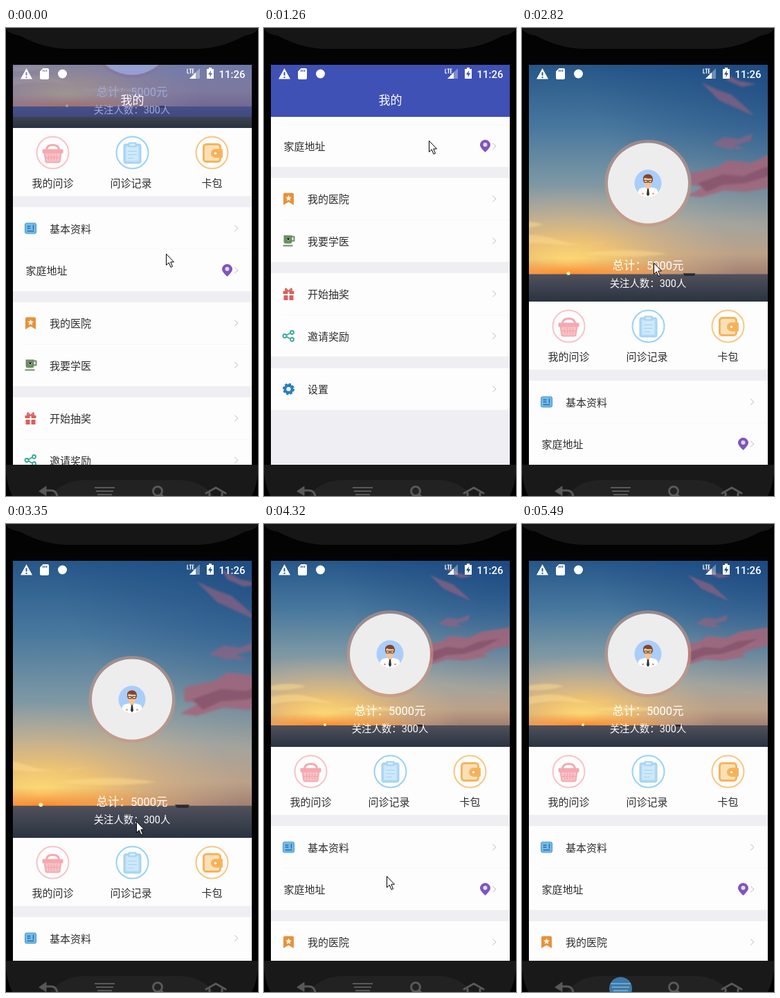
Recreate the animation shown at these times as an HTML page. Size 364x674 px, loop 6.08 s.

```html
<!DOCTYPE html>
<html lang="zh-CN">
<head>
<meta charset="utf-8">
<style>
  html, body { margin: 0; width: 100%; height: 100%; overflow: hidden; background: #030303; }
  svg { display: block; width: 364px; height: 674px; }
  text { font-family: Roboto, "Noto Sans CJK SC", "Noto Sans CJK", sans-serif; fill: #2e2e2e; font-size: 15px; }
  .mid { text-anchor: middle; }
  .light { fill: #fff; }
  .line { fill: none; stroke-linecap: round; stroke-linejoin: round; }
</style>
</head>
<body>
<svg viewBox="0 0 364 674">
  <defs>
    <clipPath id="screen"><path d="M10 53H355V629H10Z"/></clipPath>
    <clipPath id="face"><circle r="20"/></clipPath>
    <filter id="soft"><feGaussianBlur stdDeviation="1.200"/></filter>
    <linearGradient id="sky" x2="0" y2="1">
      <stop stop-color="#265789"/><stop offset=".3" stop-color="#49789e"/>
      <stop offset=".55" stop-color="#7a96a4"/><stop offset=".75" stop-color="#a3a49e"/>
      <stop offset=".9" stop-color="#bba188"/><stop offset="1" stop-color="#a27d70"/>
    </linearGradient>
    <radialGradient id="dusk" cx="1" cy="0" r="1">
      <stop stop-color="#143f7c" stop-opacity=".6"/><stop offset="1" stop-color="#143f7c" stop-opacity="0"/>
    </radialGradient>
    <radialGradient id="glow">
      <stop stop-color="#ffe078"/><stop offset=".3" stop-color="#fbca6c" stop-opacity=".8"/>
      <stop offset=".65" stop-color="#e6bd82" stop-opacity=".4"/><stop offset="1" stop-color="#d8bd98" stop-opacity="0"/>
    </radialGradient>
    <radialGradient id="ember">
      <stop stop-color="#ff8a2c"/><stop offset="1" stop-color="#ee8846" stop-opacity="0"/>
    </radialGradient>
    <linearGradient id="sea" x2="0" y2="1"><stop stop-color="#50515c"/><stop offset="1" stop-color="#29323f"/></linearGradient>
  </defs>

  <!-- phone body -->
  <path fill="#030303" d="M0 0H364V674H0Z"/>
  <path fill="#161616" d="M0 0H364Q362 8 345 11Q310 30 275 30H90Q55 30 20 11Q2 8 0 0Z"/>
  <path fill="#191919" d="M0 629H364V640Q362 660 355 674H9Q2 660 0 640Z"/>
  <path fill="#222" d="M64 674Q82 652 112 651H252Q282 652 300 674Z"/>
  <circle id="hover" cx="142.500" cy="669" r="16.500" fill="#3c79a8"/>
  <g class="line" stroke="#585858" stroke-width="3">
    <path fill="#585858" stroke-width="1" d="M48 667L58 660V673Z"/>
    <path d="M57 666H65Q73 666 74 675"/>
    <path id="menu" stroke-width="2" stroke-linecap="butt" d="M128 662H157M130 667H155M132 672H153"/>
    <circle cx="219" cy="667" r="6.500"/><path d="M224 672L229 677M289 670L303 662L317 670M294 670V676M312 670V676"/>
  </g>

  <g clip-path="url(#screen)">
    <path fill="#efeef3" d="M10 53H355V629H10Z"/>
    <g id="photo">
      <path fill="url(#sky)" d="M-155 0H190V238H-155Z"/>
      <path fill="url(#dusk)" d="M-60 0H190V190H-60Z"/>
      <ellipse cx="-77" cy="226" rx="195" ry="90" fill="url(#glow)"/>
      <ellipse cx="-77" cy="237" rx="150" ry="18" fill="url(#ember)"/>
      <g fill="#ffdc8c" opacity=".5" filter="url(#soft)">
        <path d="M-155 196Q-120 188 -90 198T-30 199Q-65 206 -95 203T-155 207Z"/>
        <path d="M-155 180Q-125 174 -105 181Q-130 188 -155 186ZM-60 214Q-15 206 35 214Q-10 220 -60 214Z"/>
      </g>
      <g filter="url(#soft)">
        <path fill="#a5667b" opacity=".85" d="M62 122L92 116L104 108L130 111L150 102L190 96V122L168 127L152 134L158 138L124 144L100 142L74 150L58 148L76 138L62 136Z"/>
        <path fill="#7d4a66" opacity=".6" d="M70 134L98 124L122 126L146 116L176 112L150 126L124 134L98 136L80 144Z"/>
        <path fill="#99637f" opacity=".65" d="M86 90L100 82L116 84L132 78L130 86L112 91L124 96L102 95ZM74 20L92 28L108 34L124 48L134 58L116 50L94 40ZM98 8L116 18L136 22L120 25L104 18Z"/>
      </g>
      <path fill="url(#sea)" d="M-155 237H190V269H-155Z"/>
      <path fill="#2a2a34" d="M53 236H67L66 239H55Z"/>
      <circle cx="-77" cy="236" r="2" fill="#fff3a8"/>
    </g>

    <g id="avatar">
      <circle r="60" fill="none" stroke="#cb9482" stroke-opacity=".6" stroke-width="5"/>
      <circle r="58" fill="#ededed"/>
      <circle r="19.500" fill="#a9cefa"/>
      <g clip-path="url(#face)">
        <path fill="#fff" d="M-14 20V11Q-13 7 -5 6H5Q13 7 14 11V20Z"/>
        <path fill="#f2c49b" d="M-3 3H3V7L0 10L-3 7ZM-6 -8H6V-1Q5 5 0 6Q-5 5 -6 -1Z"/>
        <path fill="#80452d" d="M-7 -2V-8Q-6 -13 1 -13Q8 -12 7 -2L5 -7Q0 -6 -5 -8Z"/>
        <path class="line" stroke="#6b4a30" stroke-width="1.200" d="M-6 -4H-1V-1H-5ZM1 -4H6L5 -1H1ZM-1 -3H1"/>
        <path fill="#333" d="M-1 8H1L2 16L0 19L-2 16Z"/>
        <path fill="#d98" d="M-9 14H-6V16H-9ZM6 14H9V16H6Z"/>
      </g>
    </g>

    <g id="list">
      <text class="mid light" x="182" y="-46.500" style="font-size:16.500px">总计：5000元</text>
      <text class="mid light" x="182" y="-21.500" style="font-size:14.400px">关注人数：300人</text>
      <path fill="#fdfdfd" d="M10 0H355V98H10ZM10 114H355V235H10ZM10 251H355V372H10ZM10 388H355V508H10ZM10 525H355V585H10Z"/>
      <path stroke="#f8f7f9" d="M28 174.500H355M28 311.500H355M28 448.500H355"/>

      <g class="line" transform="translate(67.500 35.500)" stroke="#f4a9b0" stroke-width="2">
        <circle r="23" stroke="#f7c4c8"/>
        <path fill="#f7c3c8" d="M-12 0H12L10 13Q9 14 8 14H-8Q-9 14 -10 13Z"/>
        <path fill="#f4a9b0" d="M-14 -4H14V0H-14Z"/>
        <path stroke-width="3" d="M-9 -5Q-8 -11 0 -11T9 -5"/>
        <path stroke-width="1.500" d="M-6 3V11M-2 3V11M2 3V11M6 3V11M-10 7H10"/>
      </g>
      <g class="line" transform="translate(182.500 35.500)" stroke="#a3d3f4" stroke-width="2">
        <circle r="23" stroke="#97d2f5"/>
        <rect x="-12" y="-12" width="24" height="27" rx="3" fill="#b2daf6"/>
        <path fill="#cfe8fa" stroke="none" d="M-9 -9H9V12H-9Z"/>
        <path fill="#d9edfb" d="M-5 -14H5V-9H-5Z"/><path stroke-width="1.200" d="M-6 -2H6M-6 3H6M-6 8H2"/>
      </g>
      <g class="line" transform="translate(297.500 35.500)" stroke="#f6b45c" stroke-width="3">
        <circle r="23" stroke="#f8c683" stroke-width="2"/>
        <rect x="-12" y="-12" width="24" height="25" rx="4" fill="#fae0b6"/>
        <path fill="#f6b054" d="M5 -4H14V6H5Q0 5 0 1T5 -4Z"/><circle cx="5" cy="1" r="1.800" fill="#fff" stroke="none"/>
      </g>
      <text class="mid" x="67.500" y="85">我的问诊</text>
      <text class="mid" x="180.500" y="85">问诊记录</text>
      <text class="mid" x="297.500" y="85">卡包</text>

      <g transform="translate(35.500 144.500)">
        <rect x="-8" y="-7.500" width="16" height="15" rx="2" fill="#74bdea" stroke="#4494cb"/>
        <path stroke="#286da5" stroke-width="1.500" d="M-5 -3H0M-5 0H0M-5 4H5M4 -5V2"/>
      </g>
      <path fill="#7e55bd" d="M319.500 214Q312 207 312 203.500A7.500 7.500 0 0 1 327 203.500Q327 207 319.500 214Z"/>
      <circle cx="319.500" cy="203" r="3" fill="#e3daf2"/>
      <g transform="translate(35.500 281.500)">
        <path fill="#e5923c" d="M-7.500 -7Q-7.500 -9 -5.500 -9H5.500Q7.500 -9 7.500 -7V8.500L0 4L-7.500 8.500Z"/>
        <path fill="#fff0da" d="M0 -6L1.300 -3L4.500 -2.700L2 -.500L2.800 2.500L0 .900L-2.800 2.500L-2 -.500L-4.500 -2.700L-1.300 -3Z"/>
      </g>
      <g transform="translate(35.500 341.500)">
        <path fill="#6d8e62" d="M-7 -8H5V1Q5 4 2 4H-4Q-7 4 -7 1ZM-8 6H6V8H-8Z"/>
        <path class="line" stroke="#6d8e62" stroke-width="2" d="M5 -6H8V0H5"/>
        <path stroke="#b9cbad" d="M-3 -3L0 0L2 -4"/>
      </g>
      <g transform="translate(35.500 418)">
        <path fill="#d8615b" d="M-8 -4H-1V0H-8ZM1 -4H8V0H1ZM-7 2H-1V9H-7ZM1 2H7V9H1Z"/>
        <path class="line" stroke="#d8615b" stroke-width="1.700" d="M0 -4L-4 -8L-5 -5ZM0 -4L4 -8L5 -5Z"/>
      </g>
      <g class="line" transform="translate(35.500 478.500)" stroke="#38a999" stroke-width="1.800">
        <path d="M4 -5L-5 0L4 5"/><g fill="#fff"><circle cx="5" cy="-5" r="2.500"/><circle cx="-5.500" r="2.500"/><circle cx="5" cy="5" r="2.500"/></g>
      </g>
      <g transform="translate(35.500 555)" fill="none" stroke="#267ebd">
        <circle r="7.200" stroke-width="2.600" stroke-dasharray="3.400 2.255"/><circle r="5" stroke-width="4"/>
        <circle r="3" fill="#e9f2fa" stroke="none"/>
      </g>
    </g>

    <path id="toolbar" fill="#3f51b5" d="M10 53H355V128H10Z"/>
    <text id="title" class="mid light" x="182.500" y="109.500" style="font-size:17px">我的</text>

    <!-- status bar -->
    <g fill="#fff">
      <path fill-rule="evenodd" d="M29.500 58L38 73.500H21ZM28.500 63.500V68.500H30.500V63.500ZM28.500 70V72H30.500V70Z"/>
      <path fill-rule="evenodd" d="M53.500 58H60Q62 58 62 60V72Q62 74 60 74H51Q49 74 49 72V62.500ZM53 60V63H54.200V60ZM55.500 60V63H56.700V60ZM58 60V63H59.200V60Z"/>
      <circle cx="81.500" cy="66" r="6.500"/>
      <path opacity=".35" d="M280 58V73H265Z"/><path d="M274 64V73H265Z"/>
      <path fill-rule="evenodd" d="M293 57H297V59H300V73H290V59H293ZM296 61L292 67H294.500V71L298 65H295.500Z"/>
    </g>
    <path class="line" stroke="#fff" stroke-width="1.200" d="M262 59V65H264M265 59H268M266.500 59V65M271 59H269.500V65H271M269.500 62H271"/>
    <text class="light" x="307.500" y="71.500" style="font-weight:500">11:26</text>
  </g>

  <path id="cursor" fill="#fff" stroke="#000" d="M.500 .500V16.500L4.300 13L7 19.500L9.500 18.500L6.800 12H11.500Z"/>
</svg>
<script>
const LOOP = 6080, TOP = 53, REST = 321, END = -35;
const $ = id => document.getElementById(id);
const lerp = (a, b, k) => a + (b - a) * k;
const clamp = v => Math.max(0, Math.min(1, v));
const outQuad = k => k * (2 - k);

const rows = [[145, '基本资料'], [205.5, '家庭地址', 28.5], [281.5, '我的医院'], [342, '我要学医'],
  [418.5, '开始抽奖'], [479, '邀请奖励'], [555.5, '设置']];
$('list').insertAdjacentHTML('beforeend', rows.map(([y, label, x = 63]) =>
  `<text x="${x}" y="${y + 5.5}">${label}</text>
   <path class="line" stroke="#bdbdbd" d="M330.500 ${y - 4.5}l4.500 4l-4.500 4"/>`).join(''));

// [time, bottom edge of the header, easing into this key]
const edgeKeys = [[0, 145], [560, END, outQuad], [1500, END], [1860, 250], [2050, REST, outQuad],
  [2660, REST], [2820, 394], [3350, 452, outQuad], [3900, 463, outQuad], [4050, REST, outQuad]];
// [time, x, y] of the pointer tip
const pointerKeys = [[0, 231, 325], [500, 237, 152], [1260, 238, 162], [1440, 238, 162], [1530, 234, 217],
  [1860, 213, 502], [2050, 212, 530], [2600, 190, 230], [2820, 190, 338], [3350, 188, 428], [3900, 177, 507],
  [4320, 177, 507], [4950, 165, 611], [5460, 143, 680]];

function sample(keys, t, column) {
  const i = keys.findIndex(key => key[0] > t);
  if (i < 0) return keys[keys.length - 1][column];
  const a = keys[i - 1], b = keys[i], k = (t - a[0]) / (b[0] - a[0]);
  const ease = typeof b[2] === 'function' ? b[2] : v => v;
  return lerp(a[column], b[column], ease(k));
}

function move(id, x, y, scale = 1) {
  $(id).setAttribute('transform', `translate(${x} ${y}) scale(${scale})`);
}

function draw() {
  const t = performance.now() % LOOP;
  const edge = Math.round(sample(edgeKeys, t, 1));
  const scroll = REST - edge;
  const x = sample(pointerKeys, t, 1), y = sample(pointerKeys, t, 2);

  move('photo', 165, TOP - Math.max(0, scroll), Math.max(1, (edge - TOP) / (REST - TOP)));
  move('avatar', 182, scroll > 0 ? edge - 134.5 : (edge + TOP) / 2);
  move('list', 0, edge);
  move('cursor', Math.round(x), Math.round(y));
  $('toolbar').setAttribute('opacity', clamp(scroll / (REST - END)));
  $('title').setAttribute('opacity', scroll > 140 ? 1 : 0);

  const hovered = y > 650;
  $('hover').setAttribute('opacity', hovered ? 1 : 0);
  $('menu').setAttribute('stroke', hovered ? '#6fa5cb' : '#585858');
  requestAnimationFrame(draw);
}
draw();
</script>
</body>
</html>
```
